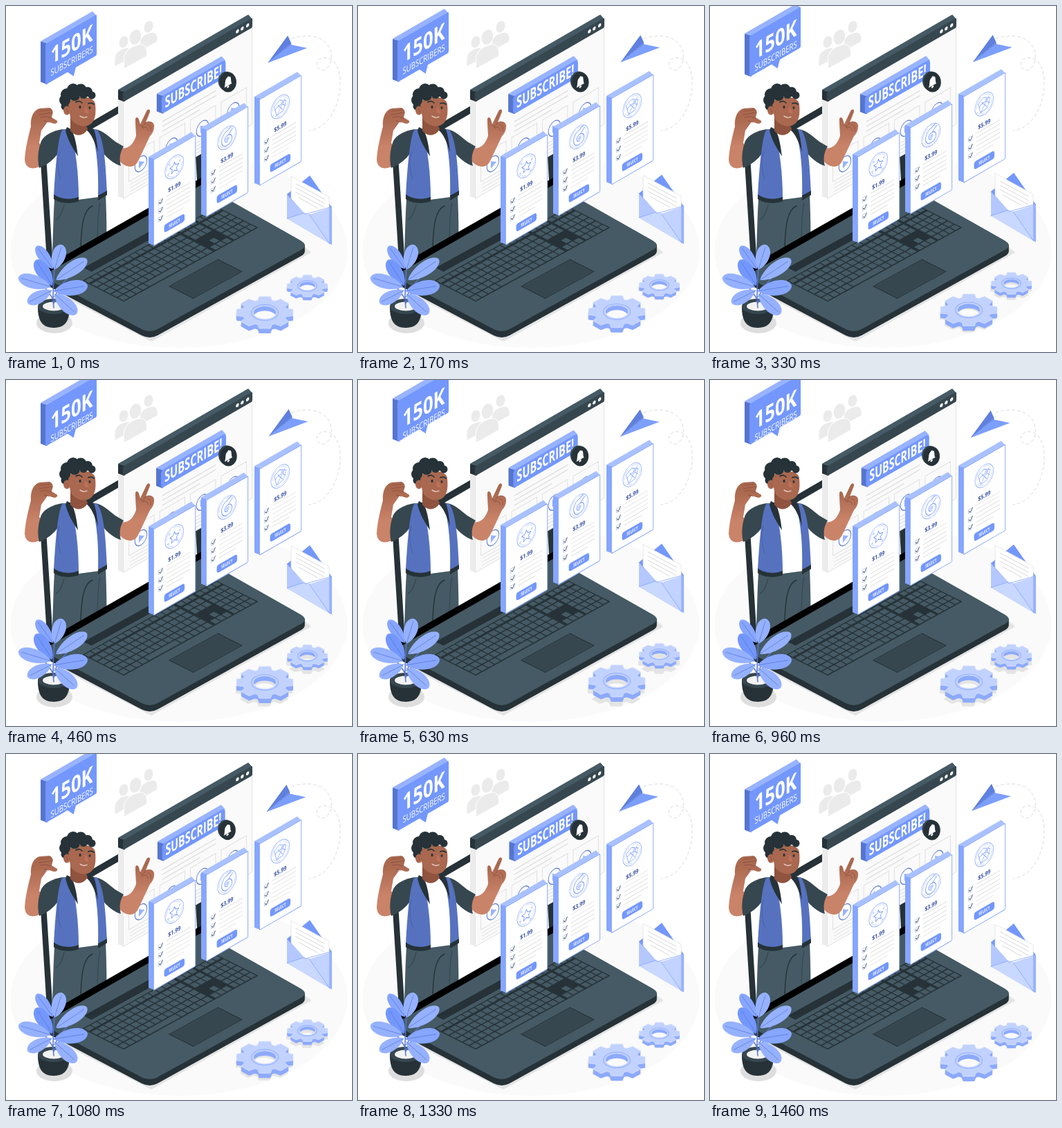
These frames come from a looping animation (500x500 px, 1.5 s). An HTML page:

```html
<!DOCTYPE html>
<html lang="en">
<head>
<meta charset="utf-8">
<title>Subscribe</title>
<style>
html, body { margin: 0; width: 100%; height: 100%; overflow: hidden; background: #fff; }
svg { display: block; width: 100vw; height: 100vh; }
text { font-family: "Open Sans", "Noto Sans", sans-serif; }
</style>
</head>
<body>
<svg id="stage" viewBox="0 0 500 500" xmlns="http://www.w3.org/2000/svg"></svg>
<script>
const LOOP = 1500, COS = .866;
const BLUE = '#7397fc', DEEP = '#5675cf', SKY = '#98b3ff', PALE = '#c2d2ff';
const INK = '#263238', SLATE = '#37474f', STEEL = '#455a64';
const SKIN = '#a9684f', SHADE = '#8f533f', ARM = 'url(#arm)', VEST = '#5672bf';

// drawing helpers
const poly = (pts, fill, extra = '') => `<polygon points="${pts}" fill="${fill}" ${extra}/>`;
const path = (d, fill, extra = '') => `<path d="${d}" fill="${fill}" ${extra}/>`;
const line = (d, color, w = 1, extra = '') =>
  `<path d="${d}" fill="none" stroke="${color}" stroke-width="${w}" stroke-linecap="round" stroke-linejoin="round" ${extra}/>`;
const oval = (x, y, rx, ry, fill, extra = '') =>
  `<ellipse cx="${x}" cy="${y}" rx="${rx}" ry="${ry}" fill="${fill}" ${extra}/>`;
const rect = (x, y, w, h, fill, r = 0, extra = '') =>
  `<rect x="${x}" y="${y}" width="${w}" height="${h}" rx="${r}" fill="${fill}" ${extra}/>`;
const group = (body, id) => `<g id="${id}">${body}</g>`;
const wall = (x, y, body) => `<g transform="matrix(${COS} -.5 0 1 ${x} ${y})">${body}</g>`;
const label = (s, x, y, size, fill, squeeze = 1, weight = 700) =>
  `<text transform="translate(${x} ${y}) scale(${squeeze} 1)" font-size="${size}" font-weight="${weight}" fill="${fill}" text-anchor="middle">${s}</text>`;
const round = c => `stroke="${c}" stroke-width="1.6" stroke-linejoin="round"`;

// upright panel with a left side and a top edge
function slab(x, y, w, h, [front, side, top], r, body = '', dx = 6.2, dy = 3.6) {
  const X = x + w * COS, Y = y - w / 2;
  return poly([x + 2, y, x - dx, y - dy, X - dx, Y - dy, X - 1, Y + 2], top, round(top)) +
    poly([x + 2, y, x - dx, y - dy + 1, x - dx, y + h - dy - 1, x + 2, y + h - 1.6], side, round(side)) +
    wall(x, y, rect(0, 0, w, h, front, r) + body);
}

function people() {
  const one = (x, y, s) => `<g transform="translate(${x} ${y}) scale(${s})">` +
    oval(0, 0, 8, 11, '#ebebeb', 'transform="rotate(18)"') +
    path('M-16 45 V31 C-15 20 -6 14 3 12 C11 9 16 13 16 21 V27 Z', '#ebebeb') + '</g>';
  return one(170, 52, .78) + one(206, 30, .78) +
    `<g stroke="#fff" stroke-width="2" paint-order="stroke">${one(187, 45, 1)}</g>`;
}

function browser() {
  const bar = slab(169, 125, 216, 14, [SLATE, INK, STEEL], 2,
    [191, 199, 208].map(x => oval(x, 7, 2.6, 2.6, '#fff')).join(''));
  let page = rect(.5, 0, 215, 140.5, 'none', 1, 'stroke="#e0e0e0"') +
    line('M66 62 H155 M66 69 H155 M66 76 H128', '#dedede', 1.3);
  for (let i = 0; i < 4; i++) {
    const x = 10 + i * 51.3;
    page += rect(x, 83, 42, 38, '#fafafa', 0, 'stroke="#dcdcdc"') +
      oval(x + 20, 105, 10, 10.5, '#fff', `stroke="${DEEP}" stroke-width="1.1"`) +
      path(`M${x + 16.5} 99.5 L${x + 26} 105 L${x + 16.5} 110.5Z`, SKY) +
      line(`M${x + 2} 126 H${x + 40} M${x + 2} 131 H${x + 40} M${x + 2} 136 H${x + 28}`, '#e0e0e0', 1.2);
  }
  return slab(169, 138, 216, 141, ['#fafafa', '#ececec', '#eee'], 1, page) + bar;
}

function button() {
  const bell = path('M-6.5 5 C-4.5 3 -5.5 -3 -4 -5.5 C-3 -7 -2 -7 -1.2 -7.6 Q0 -9.6 1.2 -7.6 C2 -7 3 -7 4 -5.5 C5.5 -3 4.5 3 6.5 5Z', '#fff') +
    oval(0, 6.8, 2, 1.5, '#fff');
  return slab(224, 131, 108.5, 26, [BLUE, DEEP, SKY], 5,
    label('SUBSCRIBE!', 54, 20, 23, '#fff', .74)) +
    oval(319, 108.5, 12, 14, SLATE) + oval(321.5, 110, 12.2, 14.6, INK) + wall(321.5, 110, bell);
}

function man() {
  let s = '';
  // trousers
  s += path('M70 279 L106 276 L144 269 C145 300 146 325 145 350 L110 375 L66 375 C68 345 68 310 70 279Z', STEEL) +
    line('M125 289 C113 294 109 312 108 350', INK, 1.4) + line('M84 287 C81 300 77 306 72 309', SLATE, 1.2) +
    line('M136 285 C132 300 133 320 132 338', SLATE, 1.2);
  // raised forearms and hands
  s += path('M36 174 C35 160 40 150 49 148 L63 147 C67 149 69 153 67 157 L66 161 L74 166 C75 170 70 171 66 169 L60 167 C57 172 53 177 51 180 L48 198 L57 210 L49 232 C38 237 28 235 27 222 C28 205 32 190 36 174Z', ARM) +
    line('M48 157 L66 154 M50 161 C55 159 60 160 65 162 M55 166 L62 168 M48 152 L65 150', SHADE, .9);
  s += path('M162 204 C172 208 182 205 188 188 C188 182 187 175 187 164 C187 160 191 160 192 164 L194 171 L203 152 C205 148 209 149 208 153 L202 168 C208 165 215 168 214 175 C214 180 211 185 208 188 L191 224 C188 230 184 232 179 232 C173 232 167 228 162 222Z', ARM) +
    line('M194 171 L197 176 L202 168 M198 177 C202 173 205 175 205 180 M205 172 C209 172 210 176 209 181', SHADE, .9);
  // sleeves, shirt, vest
  s += path('M82 178 C68 180 56 186 51 195 C46 208 45 222 48 234 C59 230 69 222 76 212Z', SLATE) +
    path('M128 178 C139 179 149 189 158 196 L170 203 C165 211 163 220 166 231 C156 228 146 220 139 211Z', SLATE) +
    path('M91 178 L125 178 C133 210 134 245 134 276 L104 280Z', '#fff') +
    path('M82 178 C76 186 72 220 69 274 C78 283 94 283 105 278 C105 242 101 208 93 178Z', VEST) +
    path('M88 175 L94 178 C101 190 102 204 104 217 C96 205 89 193 86 180Z', INK) +
    path('M123 177 L132 179 C143 196 144 235 146 268 L133 275 C134 240 132 207 123 177Z', VEST) +
    path('M116 174 L127 178 C131 190 132 202 133 211 C128 196 123 184 116 179Z', INK) +
    path('M69 272 C79 280 94 280 105 276 V282 C94 286 79 286 69 279Z', INK) +
    path('M133 274 L146 267 V273 L133 281Z', INK) +
    line('M77 211 C74 224 75 239 79 250', '#4963ad', 1.2);
  // head
  s += path('M93 158 L93 180 C99 189 112 189 118 178 L115 170Z', SHADE) +
    path('M89 143 C89 128 128 127 129 142 C130 153 130 164 123 170 C115 177 101 173 94 164Z', SKIN);
  const curls = [[85, 136, 8], [88, 128, 9], [97, 121, 9], [108, 121, 8.5], [118, 124, 7], [124, 129, 5.5], [85, 145, 5.5], [99, 129, 8], [112, 128, 6]];
  s += curls.map(([x, y, r]) => oval(x, y, r, r, INK)).join('');
  return s + oval(88, 151, 5, 6.5, SKIN) + line('M86 149 C89 149 90 152 89 154', SHADE, .9) +
    line('M101 139 Q106 136 110 140 M119 141 Q123 139 127 142', INK, 1.7) +
    oval(107, 146, 1.5, 2.2, INK) + oval(121, 147, 1.4, 2.1, INK) +
    path('M115 145 L120 155 Q115 156 113 153Z', '#c0705d') +
    line('M107 159 Q112 163 117 160', '#f0dcd4', 1.2);
}

// laptop deck outline with rounded front and right corners
const deckShape = 'M56 388 L283 258 L426 339 Q437 345.5 427 352 L219 467 Q208 473 196 467 L56 393Z';
function base() {
  let deck = rect(18, 10, 62, 7.5, INK) + rect(9.8, 21, 85.6, 39.5, INK);
  for (let r = 0; r < 6; r++) {
    const v = 22 + r * 6.4, h = r ? 5.3 : 4.3;
    for (let c = 0; c < 14; c++) {
      if (r == 5 && c > 3 && c < 9) continue;
      deck += rect(10.5 + c * 4.1, v, 3.5, h, STEEL);
    }
    if (r == 5) deck += rect(26.9, v, 19.9, h, STEEL);
    for (let c = 0; c < 3; c++) {
      if (r < 3 || r == 5 || (r == 4 && c == 1)) deck += rect(69 + c * 3.7, v, 3.1, h, STEEL);
    }
    for (let c = 0; c < 4; c++) deck += rect(81 + c * 3.6, v, 3, h, STEEL);
  }
  deck += rect(33, 69, 31, 23, SLATE, 0, `stroke="${INK}" stroke-width=".5"`);
  let edge = '';
  for (let d = 9; d > 0; d -= 2) edge += path(deckShape, INK, `transform="translate(0 ${d})"`);
  return poly([60, 375, 286, 246, 286, 262, 56, 390], '#000') + edge + path(deckShape, STEEL) +
    `<g transform="matrix(2.27 -1.25 1.52 .77 56 393)">${deck}</g>`;
}

function screen() {
  return poly([50, 211, 275, 80, 286, 258, 61, 388], INK, round(INK)) +
    poly([58, 216, 267, 95, 276, 252, 68, 376], '#fff');
}

function star(cx, cy, r) {
  const pts = [];
  for (let i = 0; i < 10; i++) {
    const a = i * Math.PI / 5 - Math.PI / 2, q = i % 2 ? r * .48 : r;
    pts.push((cx + q * Math.cos(a)).toFixed(1), (cy + q * Math.sin(a)).toFixed(1));
  }
  return poly(pts, '#fff', `stroke="${BLUE}" stroke-linejoin="round"`);
}

const badges = [
  star(35, 29, 8) + [[27, 21], [44, 23], [25, 34], [42, 38]].map(([x, y]) => oval(x, y, 1.5, 1.5, PALE)).join(''),
  line('M36 18 C24 18 22 39 35 39 C46 39 46 25 37 25 C30 25 29 34 36 34 M36 18 L42 15 M37 25 L44 19', BLUE) + oval(36, 30, 3, 3, PALE),
  line('M25 23 L34 18 L45 24 L40 36 L29 38Z M29 38 L43 20 M26 29 Q36 21 44 31 M31 24 L39 34', SKY) + oval(39, 24, 3, 3, PALE)
];

function card(x, y, price, badge) {
  let s = oval(35, 28, 15.5, 15.5, '#fff', `stroke="${SKY}" stroke-width=".9"`) +
    oval(35, 28, 13.2, 13.2, 'none', `stroke="${PALE}" stroke-width=".8" stroke-dasharray="16 4"`) + badge +
    label(price, 35, 60, 8.8, '#3d57a8', .93);
  for (let i = 0; i < 3; i++) {
    const v = 67 + i * 12.2;
    s += rect(8.5, v - 3, 6, 6, '#fff', .6, 'stroke="#b5c3ea" stroke-width=".8"') +
      line(`M9.6 ${v} l2 2 l4 -5`, SLATE, .9) +
      line(`M22 ${v - 3} H61 M22 ${v + 3} H${i == 2 ? 50 : 61}`, '#dcdcdc', .9);
  }
  s += rect(18, 103.5, 34, 11.5, BLUE, 3.5) + label('SELECT', 35, 111.7, 6.6, '#fff', .82);
  return slab(x, y, 70.5, 125, ['#fff', '#86a6ff', '#a9c1ff'], 1.5,
    rect(.4, .4, 69.7, 124.2, 'none', 1.5, `stroke="${BLUE}" stroke-width=".9"`) + s);
}

const bubble = () => slab(57, 55, 85.5, 59, [BLUE, DEEP, SKY], 2, path('M36 58 L47 70 L51 58Z', BLUE));
const count = () => wall(57, 55, label('150K', 44, 34, 33, '#fff', .9) +
  label('SUBSCRIBERS', 44, 51, 13.2, '#fff', .84, 400));

function gearShape(cx, cy, rx, ry) {
  const pts = [], spots = [[-.32, .79], [-.2, 1], [.2, 1], [.32, .79]];
  for (let i = 0; i < 8; i++)
    for (const [d, q] of spots) {
      const a = i * Math.PI / 4 + d;
      pts.push((cx + rx * q * Math.cos(a)).toFixed(1) + ' ' + (cy + ry * q * Math.sin(a)).toFixed(1));
    }
  const hx = rx * .4, hy = ry * .4;
  return `M${pts.join('L')}Z M${cx - hx} ${cy}a${hx} ${hy} 0 1 0 ${2 * hx} 0a${hx} ${hy} 0 1 0 ${-2 * hx} 0Z`;
}
const even = 'fill-rule="evenodd" stroke-linejoin="round"';
function gear(cx, cy, rx, ry, depth) {
  let s = '';
  for (let d = depth; d > 0; d--)
    s += path(gearShape(cx, cy + d, rx, ry), '#8daafb', even);
  return s + path(gearShape(cx, cy, rx, ry), PALE, even + ' stroke="#d5e0ff" stroke-width=".8"') +
    oval(cx, cy, rx * .47, ry * .48, 'none', `stroke="${SKY}" stroke-width="1.2"`);
}
const gearShadow = (x, y, rx, ry) => path(gearShape(x, y, rx, ry), '#e4e4e4', even);

function envelope() {
  return poly([406, 272, 439, 245, 471, 291, 471, 345, 406, 307], BLUE) +
    poly([412, 246, 467, 276, 467, 320, 412, 290], '#fff', 'stroke="#e2e2e2" stroke-width=".8"') +
    line('M419 257 L460 279 M419 263 L460 285 M419 269 L460 291 M423 277 L450 292', '#d9d9d9', 1) +
    poly([406, 272, 433, 303, 406, 307], '#b4c8ff') +
    poly([470, 291, 433, 303, 468, 343], '#c3d3ff') +
    poly([406, 307, 431, 299, 438, 301, 468, 344], '#c9d8ff') +
    poly([467, 291, 471, 290, 471, 345, 467, 343], SKY) +
    line('M406 272 L432 301 L468 291 M406 307 L431 299 M438 301 L468 344', '#86a5fb', .8);
}

function plane() {
  return poly([378, 82.5, 407, 43, 412, 54], '#5f80de') +
    poly([378, 82.5, 412, 54, 411, 69, 397, 73], DEEP) +
    poly([378, 82.5, 411, 56, 435, 61], '#7c9ffd');
}

function leaf(bx, by, tx, ty, w, c) {
  const dx = tx - bx, dy = ty - by, n = Math.hypot(dx, dy), px = -dy / n * w, py = dx / n * w;
  const at = (f, k) => `${(bx + dx * f + px * k).toFixed(1)} ${(by + dy * f + py * k).toFixed(1)}`;
  return path(`M${bx} ${by}C${at(.3, 1.2)} ${at(.95, 1.2)} ${tx} ${ty}C${at(.95, -1.2)} ${at(.3, -1.2)} ${bx} ${by}Z`, c) +
    line(`M${bx} ${by}L${at(.9, 0)}`, DEEP, .7);
}
function plant() {
  const tone = '#87a6ff', lit = '#95b1ff';
  return oval(70, 458, 26, 15, '#dedede') +
    path('M46 434 C46 450 49 465 69 465 C89 465 92 450 92 434Z', INK) + oval(69, 434, 23, 11, SLATE) +
    oval(69, 434, 16, 6.5, '#f2f2f2') +
    line('M69 436 C66 415 70 395 70 375 M69 425 C60 410 52 402 46 398 M70 420 C78 405 84 398 92 390 M69 430 C74 418 80 410 86 408', DEEP, 1.5) +
    leaf(68, 380, 44, 347, 9, tone) + leaf(70, 381, 81, 345, 11, lit) +
    leaf(72, 396, 117, 366, 11, lit) + leaf(67, 404, 43, 367, 11, BLUE) +
    leaf(65, 406, 18, 392, 11, lit) + leaf(69, 412, 118, 404, 12, tone) +
    leaf(66, 411, 31, 429, 10, lit) + leaf(70, 416, 102, 445, 11, lit);
}

const stage = document.getElementById('stage');
stage.innerHTML =
  `<linearGradient id="arm" x2="0" y2="1"><stop offset=".15" stop-color="${SKIN}"/><stop offset=".65" stop-color="#c98369"/></linearGradient>` +
  oval(250, 353, 243.5, 141, '#fafafa') + people() +
  line('M413 47 C440 38 465 45 470 68 C472 86 462 95 454 92 C446 88 448 77 457 75 C475 72 484 92 483 115 C481 150 462 178 438 180', '#dcdcdc', 1, 'stroke-dasharray="4 4"') +
  poly([70, 412, 210, 484, 440, 356, 420, 340], '#e4e4e4', round('#e4e4e4')) +
  screen() + browser() + group(button(), 'button') + man() + base() +
  group(card(366, 135, '$5.99', badges[2]) + card(289, 180, '$3.99', badges[1]) + card(213, 222, '$1.99', badges[0]), 'cards') +
  group(plane(), 'plane') + group(envelope(), 'mail') +
  gearShadow(373, 448, 42, 24) + gearShadow(435, 409, 30.5, 16) +
  group(gear(374, 443, 41.5, 23.5, 7) + gear(435.5, 404.5, 29.5, 16, 5), 'gears') +
  plant() + group(bubble(), 'bubble') + group(count(), 'count');

const move = (id, v) => document.getElementById(id).setAttribute('transform', v);
const wave = (t, peak) => Math.cos((t - peak) / LOOP * 2 * Math.PI);
const rise = { bubble: 25.5, count: 16.5, cards: 9, mail: 9, gears: 8.5 };

function draw(t) {
  const lift = (1 + wave(t, 735)) / 2, sway = wave(t, 350);
  for (const id in rise) move(id, `translate(0 ${-rise[id] * lift})`);
  move('plane', `translate(${1.7 * sway} ${-1.2 * sway})`);
  move('button', `translate(276 112) scale(${.985 + .017 * sway}) translate(-276 -112)`);
}

const start = performance.now();
function tick() {
  draw((performance.now() - start) % LOOP);
  requestAnimationFrame(tick);
}
draw(0);
requestAnimationFrame(tick);
</script>
</body>
</html>
```
